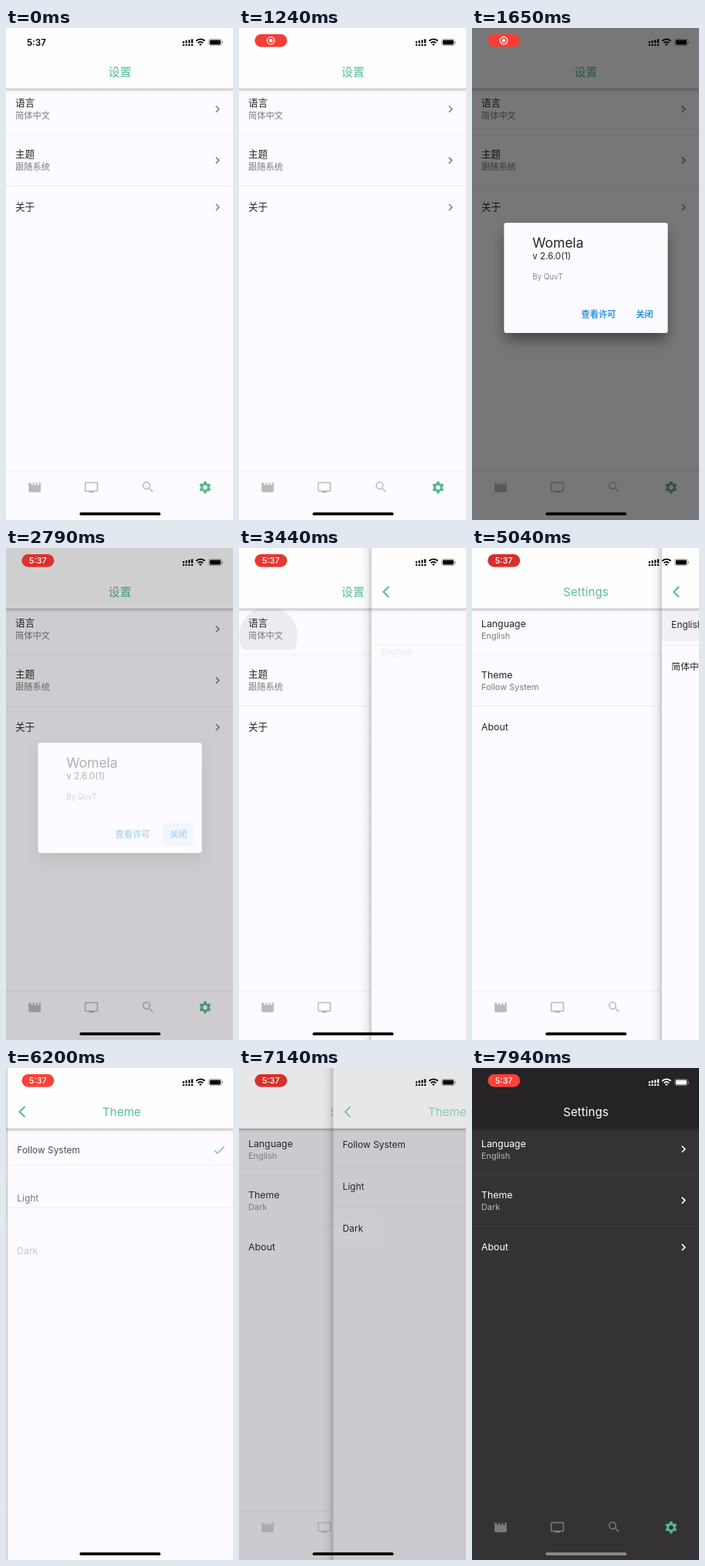
Write an HTML page that moves like this. It is 293x634 px and loops after 8 s.

```html
<!DOCTYPE html>
<html lang="en">
<head>
<meta charset="utf-8">
<title>Settings</title>
<style>
html, body { margin: 0; width: 100%; height: 100%; overflow: hidden; background: #fdfbff; }
svg { display: block; }
text { font-family: Inter, "Noto Sans CJK SC", "Noto Sans CJK", sans-serif; white-space: pre; }
</style>
</head>
<body>
<svg id="stage" width="293" height="634" viewBox="0 0 293 634">
  <defs>
    <linearGradient id="edge">
      <stop offset="0" stop-opacity="0"/>
      <stop offset=".6" stop-opacity=".05"/>
      <stop offset="1" stop-opacity=".2"/>
    </linearGradient>
    <linearGradient id="drop" x2="0" y2="1">
      <stop offset="0" stop-opacity=".27"/>
      <stop offset=".4" stop-opacity=".1"/>
      <stop offset="1" stop-opacity="0"/>
    </linearGradient>
    <filter id="blur" x="-30%" y="-30%" width="160%" height="160%">
      <feGaussianBlur stdDeviation="9"/>
    </filter>
  </defs>
  <g id="scene"></g>
</svg>
<script>
const LOOP = 8000, W = 293, H = 634;
const SLIDE_MS = 300, ITEM_MS = 500, DIALOG_MS = 300;
const scene = document.getElementById('scene');

const ICONS = {
  movie: 'M18 4l2 4h-3l-2-4h-2l2 4h-3l-2-4H8l2 4H7L5 4H4c-1.1 0-2 .9-2 2v12c0 1.1.9 2 2 2h16c1.1 0 2-.9 2-2V4z',
  tv: 'M21 3H3c-1.1 0-2 .9-2 2v12c0 1.1.9 2 2 2h5v2h8v-2h5c1.1 0 2-.9 2-2V5c0-1.1-.9-2-2-2zm0 14H3V5h18z',
  search: 'M15.5 14h-.8l-.3-.3A6.5 6.5 0 1 0 13.7 14.4l.3.3v.8l5 5L20.5 19zM9.5 14a4.5 4.5 0 1 1 0-9a4.5 4.5 0 0 1 0 9z'
};
const WORDS = {
  zh: { settings: '设置', language: '语言', theme: '主题', about: '关于', name: '简体中文', system: '跟随系统' },
  en: { settings: 'Settings', language: 'Language', theme: 'Theme', about: 'About', name: 'English', system: 'Follow System' }
};

// --- timing helpers ---
const clamp = v => Math.max(0, Math.min(1, v));
const span = (t, start, len) => clamp((t - start) / len);
const mix = (a, b, p) => a + (b - a) * p;
function bezier(x1, y1, x2, y2) {
  const at = (s, a, b) => 3 * (1 - s) * (1 - s) * s * a + 3 * (1 - s) * s * s * b + s * s * s;
  return x => {
    if (x <= 0 || x >= 1) return clamp(x);
    let lo = 0, hi = 1;
    for (let i = 0; i < 24; i++) {
      const mid = (lo + hi) / 2;
      if (at(mid, x1, x2) < x) lo = mid; else hi = mid;
    }
    return at(lo, y1, y2);
  };
}
const ease = bezier(.25, .1, .25, 1);
const easeOut = bezier(0, 0, .58, 1);
const slide = bezier(.35, .91, .33, .97);

// --- drawing helpers ---
const rgb = hex => [1, 3, 5].map(i => parseInt(hex.slice(i, i + 2), 16));
function tint(a, b, p) {
  const u = rgb(a), v = rgb(b);
  return `rgb(${u.map((c, i) => Math.round(mix(c, v[i], p)))})`;
}
const text = (s, x, y, size, fill, extra = '') =>
  `<text x="${x}" y="${y}" font-size="${size}" fill="${fill}" ${extra}>${s}</text>`;
const rect = (x, y, w, h, fill, extra = '') =>
  `<rect x="${x}" y="${y}" width="${w}" height="${h}" fill="${fill}" ${extra}/>`;
const line = (d, color, width, extra = '') =>
  `<path d="${d}" fill="none" stroke="${color}" stroke-width="${width}" ${extra}/>`;
const group = (x, y, body, opacity = 1) =>
  `<g transform="translate(${x} ${y})" opacity="${opacity}">${body}</g>`;
const ripple = (top, height, cx, cy, r, alpha) => alpha <= 0 ? '' :
  `<svg x="0" y="${top}" width="${W}" height="${height}">` +
  `<circle cx="${cx}" cy="${cy - top}" r="${r}" fill="#d4d2d6" opacity="${.4 * alpha}"/></svg>`;
const icon = (path, x, y, fill) =>
  `<path d="${path}" fill="${fill}" fill-rule="evenodd" transform="translate(${x - 9.4} ${y - 9.4}) scale(.781)"/>`;

function gear(x, y, color) {
  let teeth = '';
  for (let i = 0; i < 6; i++)
    teeth += `<path d="M-2.9 -5L-1.9 -9.8H1.9L2.9 -5Z" transform="rotate(${i * 60})"/>`;
  return `<g transform="translate(${x} ${y}) scale(.781)" fill="${color}">${teeth}` +
    `<circle r="5.5" fill="none" stroke="${color}" stroke-width="3.8"/></g>`;
}

function palette(t) {
  const p = span(t, 7092, 200), late = p ** 3;
  return {
    p,
    body: tint('#fdfbff', '#353235', p),
    head: tint('#fffeff', '#252326', p ** 1.6),
    title: tint('#5cbd92', '#ffffff', p),
    text: tint('#252427', '#ffffff', late),
    sub: tint('#7b797d', '#b9b7ba', late),
    rule: tint('#efedf1', '#424043', p),
    chevron: tint('#858387', '#ffffff', late),
    icon: tint('#bcbabd', '#7b797c', p),
    status: tint('#000000', '#ffffff', late),
    home: tint('#000000', '#8b898c', late)
  };
}

const header = (c, title) =>
  rect(0, 78, W, 5, 'url(#drop)') + rect(0, 0, W, 78, c.head) +
  text(title, 147, 61.6, 15, c.title, 'text-anchor="middle"' + (title.length > 2 ? ' letter-spacing=".1"' : ''));

const divider = (y, c) => rect(0, y, W, 1, c.rule);

function settings(t, c) {
  const zh = t < LANGUAGE.close, w = zh ? WORDS.zh : WORDS.en;
  const titleSize = zh ? 12.6 : 12.3, subSize = zh ? 11.2 : 10.9;
  const row = (y, title, sub) =>
    text(title, 12, y + (zh ? -3.9 : -3.1), titleSize, c.text) +
    text(sub, 12, y + (zh ? 12.8 : 12), subSize, c.sub);
  const chevron = y => line(`M270.9 ${y - 4}l4 4l-4 4`, c.chevron, 1.7);
  const mode = t < 7000 ? w.system : 'Dark';
  const touch = (start, hold, top, height, cy, speed) => t < start ? '' :
    ripple(top, height, 38, cy, 8 + speed * (t - start), span(t, start, 75) * (1 - span(t, start + hold, 180)));

  return rect(0, 0, W, H, c.body) +
    touch(1240, 210, 210, 42, 231, .12) +
    touch(3040, 440, 78, 53, 113, .074) +
    touch(5930, 150, 144, 53, 172, .25) +
    divider(137, c) + divider(203.4, c) +
    row(104.6, w.language, w.name) + row(170.6, w.theme, mode) +
    text(w.about, 12, 235.2, titleSize, c.text) +
    chevron(104.5) + chevron(170.6) + chevron(231) +
    header(c, w.settings) +
    rect(0, 570.6, W, 1, tint('#efedf1', '#353235', c.p)) +
    icon(ICONS.movie, 37, 592, c.icon) + icon(ICONS.tv, 110.2, 592, c.icon) +
    icon(ICONS.search, 183.4, 591.6, c.icon) + gear(257, 592, '#55b98b');
}

// A pushed list page; rows rise and fade in one after another.
function listPage(t, c, page) {
  const x = W * (t < page.close
    ? 1 - slide(span(t, page.open, SLIDE_MS))
    : slide(span(t, page.close, SLIDE_MS)));
  if (x >= W - .3) return '';
  const pressed = t - page.close;
  const top = i => i ? 77.4 + 54.2 * i : 78;
  const rows = page.items.map((label, i) => {
    const p = ease(span(t, page.open + i * ITEM_MS / 6, ITEM_MS));
    const mark = page.check(i, t);
    return group(0, 39 * (1 - p),
      text(label, 12, 102.5 + 54.2 * i, 11.9, c.text) +
      (mark > 0 ? line(`M266.8 ${99 + 54.2 * i}l3.8 3.8l8.8 -9`, '#5cbd92', 1.5, `opacity="${mark}"`) : ''), p);
  }).join('');
  const rules = page.items.slice(1).map((_, i) => divider(124.8 + 54.4 * i, c)).join('');
  const splash = pressed > 0
    ? ripple(top(page.pick), 42, 25, 98.5 + 54.2 * page.pick, 28 + .3 * pressed, .65) : '';

  return rect(x - 15, 0, 15, H, 'url(#edge)') + group(x, 0,
    rect(0, 0, W, H, c.body) + splash + rules + rows + header(c, page.title(t)) +
    line('M22 49.8l-6.8 6.7l6.8 6.7', tint('#5cbd92', '#ffffff', c.p * .8), 2.1));
}

const LANGUAGE = {
  open: 3393, close: 4925, pick: 0, items: ['English', '简体中文'],
  title: t => t < LANGUAGE.close ? '语言' : 'Language',
  check: (i, t) => i === (t < LANGUAGE.close ? 1 : 0) ? 1 : 0
};
const THEME = {
  open: 5945, close: 7093, pick: 2, items: ['Follow System', 'Light', 'Dark'],
  title: () => 'Theme',
  check: (i, t) => {
    const p = span(t, 6770, 200);
    return i === 0 ? 1 - p : i === 2 ? p : 0;
  }
};

function dialog(t) {
  const a = easeOut(t < 2000 ? span(t, 1340, DIALOG_MS) : 1 - span(t, 2560, DIALOG_MS));
  if (a <= 0) return '';
  const blue = '#2599e4', bold = 'font-weight="600"';
  const press = t > 2440
    ? `<svg x="203" y="355" width="39" height="28"><circle cx="19.5" cy="14" r="${6 + .1 * (t - 2440)}" fill="${blue}" opacity=".14"/></svg>` : '';
  return `<g opacity="${a}">` + rect(0, 0, W, H, '#000', 'opacity=".53"') +
    rect(43, 262, 208, 140, '#000', 'opacity=".42" filter="url(#blur)"') +
    rect(41.3, 251, 211.4, 142, '#fdfbff', 'rx="3"') + press +
    text('Womela', 78, 283, 17.4, '#252427') +
    text('v 2.6.0(1)', 78, 298.3, 11.5, '#252427') +
    text('By QuvT', 78, 324, 9.75, '#88868a') +
    text('查看许可', 141, 373.3, 11.2, blue, bold) +
    text('关闭', 211.4, 373.3, 11.2, blue, bold) + '</g>';
}

function statusBar(t, c) {
  let s = '';
  const show = span(t, 50, 400);
  const pulse = t < 2440 ? .75 : .5 - .5 * Math.cos((t - 5040) / 2040 * 2 * Math.PI);
  const rec = span(t, 620, 220) * (1 - span(t, 2500, 150));
  const clock = (x, y, size, fill, weight, alpha) =>
    text('5:37', x, y, size, fill, `text-anchor="middle" font-weight="${weight}" opacity="${alpha}"`);
  s += clock(39.3, 22.8, 11.4, '#000', 600, 1 - show);
  s += `<g opacity="${show}">` + rect(20.3, 8, 41.8, 16.4, tint('#d7302d', '#ff4239', pulse), 'rx="8.2"') +
    clock(41, 20, 10.8, '#fff', 500, 1 - rec) +
    `<g opacity="${rec}"><circle cx="41" cy="16.2" r="4.8" fill="none" stroke="#fff" stroke-width="1.2"/>` +
    '<circle cx="41" cy="16.2" r="2.4" fill="#fff"/></g></g>';

  for (let i = 0; i < 4; i++) {
    const x = 228 + i * 3.7, h = 2.6 + i * .9;
    s += rect(x, 19.6 - h, 2.2, h, c.status, 'rx=".5"') + rect(x, 20.8, 2.2, 2.3, c.status, 'rx=".5"');
  }
  s += line('M245.4 16.7a8 8 0 0 1 11.2 0', c.status, 1.9) +
    line('M247.7 19.3a4.7 4.7 0 0 1 6.6 0', c.status, 1.8) +
    `<path d="M249.2 21a2.6 2.6 0 0 1 3.6 0l-1.8 1.9z" fill="${c.status}"/>` +
    `<rect x="261.7" y="14.4" width="16.6" height="8.2" rx="2.3" fill="none" stroke="${c.status}" stroke-opacity=".4" stroke-width=".8"/>` +
    rect(262.9, 15.6, 14.2, 5.8, c.status, 'rx="1.3"') +
    rect(279, 17.2, 1, 2.8, c.status, 'rx=".5" opacity=".4"');
  return s + rect(95, 624.2, 104.5, 3.9, c.home, 'rx="1.9"');
}

function draw(t) {
  const c = palette(t);
  scene.innerHTML = settings(t, c) + listPage(t, c, LANGUAGE) + listPage(t, c, THEME) +
    dialog(t) + statusBar(t, c);
}

const begin = performance.now();
function tick() {
  draw((performance.now() - begin) % LOOP);
  requestAnimationFrame(tick);
}
tick();
</script>
</body>
</html>
```
